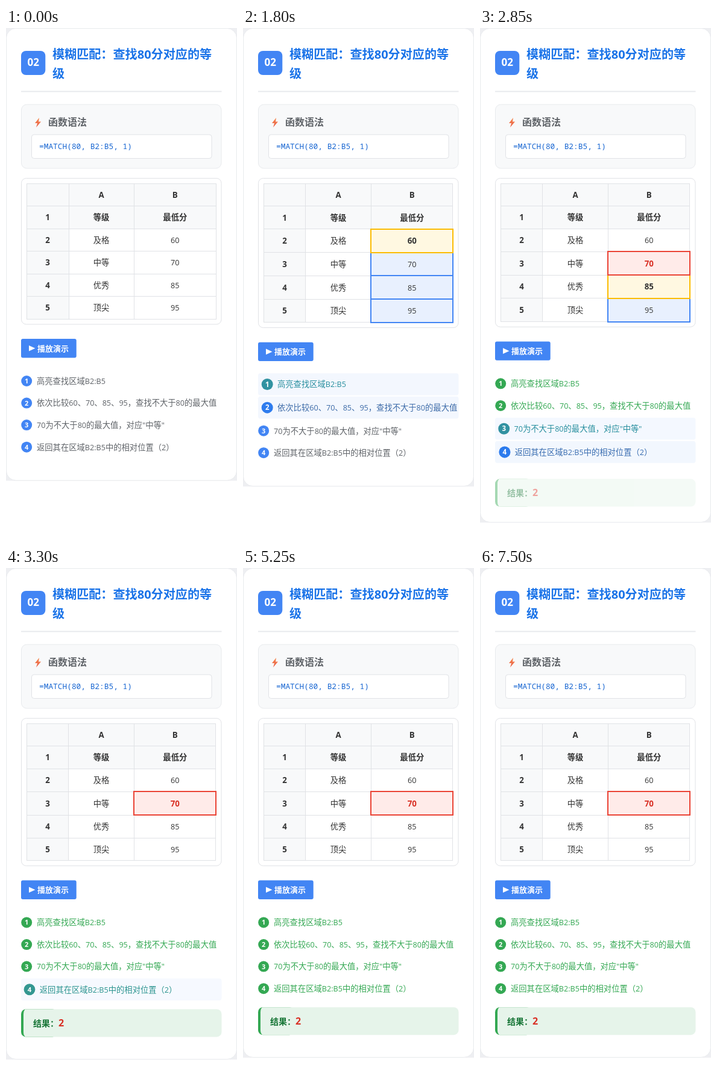
Write an HTML page that moves like this. It is 383 by 850 pixels and loops after 9750 ms.

```html
<!DOCTYPE html>
<html lang="zh-CN">
<head>
<meta charset="utf-8">
<title>MATCH</title>
<style>
  html, body { margin: 0; width: 100%; height: 100%; overflow: hidden; background: #fff; }
  svg { display: block; }
  text { font: 13.3px "Noto Sans CJK SC", "Noto Sans CJK", sans-serif; fill: #333; }
  .bold { font-weight: 700; }
  .mid { text-anchor: middle; }
  .latin { font-family: "Open Sans", "Noto Sans", sans-serif; font-size: .95em; }
  .bold .latin { font-size: 1em; }
  .code { font: 12.83px "Noto Sans Mono", "DejaVu Sans Mono", monospace; fill: #1967d2; white-space: pre; }
</style>
</head>
<body>
<svg id="stage" width="383" height="850" viewBox="0 0 383 850"></svg>
<script>
const LOOP = 9750;
const BLUE = '#1a73e8', SKY = '#4285f4', GREEN = '#34a853', GREY = '#5f6368';
const LINE = '#e0e2e6', PALE = '#f8f9fa';

// time, look of cells B2 to B5, active amount and done amount per item, result opacity
const STEPS = [
  [0,    '----', [0, 0, 0, 0],     [0, 0, 0, 0],    0],
  [1500, 'bbbb', [1, 0, 0, 0],     [0, 0, 0, 0],    0],
  [1800, 'ybbb', [.5, .5, 0, 0],   [.5, 0, 0, 0],   0],
  [1950, 'ybbb', [0, 1, 0, 0],     [1, 0, 0, 0],    0],
  [2250, '-ybb', [0, 1, 0, 0],     [1, 0, 0, 0],    0],
  [2550, '--yb', [0, 1, 0, 0],     [1, 0, 0, 0],    0],
  [2700, '-ryb', [0, 0, 1, 0],     [1, 1, 0, 0],    0],
  [2850, '-ryb', [0, 0, .46, .56], [1, 1, .5, 0],   .44],
  [3000, '-ryb', [0, 0, 0, 1],     [1, 1, 1, 0],    .88],
  [3150, '-ryb', [0, 0, 0, 1],     [1, 1, 1, 0],    1],
  [3300, '-r--', [0, 0, 0, .4],    [1, 1, 1, .6],   1],
  [3450, '-r--', [0, 0, 0, 0],     [1, 1, 1, 1],    1],
];

const CELL = {
  b: { edge: SKY, fill: '#e8f0fe', ink: '#333', cls: '' },
  y: { edge: '#fbbc04', fill: '#fff8e1', ink: '#333', cls: 'bold' },
  r: { edge: '#ea4335', fill: '#ffebe9', ink: '#d93025', cls: 'bold' },
};
const ROWS = [['', 'A', 'B'], ['1', '等级', '最低分'], ['2', '及格', '60'],
  ['3', '中等', '70'], ['4', '优秀', '85'], ['5', '顶尖', '95']];
const ITEMS = ['高亮查找区域B2:B5', '依次比较60、70、85、95，查找不大于80的最大值',
  '70为不大于80的最大值，对应"中等"', '返回其在区域B2:B5中的相对位置（2）'];

const mix = (a, b, k) => `color-mix(in srgb, ${b} ${k * 100}%, ${a})`;
const rect = (x, y, w, h, fill, r = 0, more = '') =>
  `<rect x="${x}" y="${y}" width="${w}" height="${h}" rx="${r}" fill="${fill}" ${more}/>`;
const outline = color => `stroke="${color}"`;
const line = (x1, y1, x2, y2) => `<path d="M${x1} ${y1}L${x2} ${y2}" stroke="${LINE}"/>`;
const text = (x, y, str, cls = '', style = '') =>
  `<text x="${x}" y="${y}" class="${cls}" style="${style}">` +
  str.replace(/[!-~]+/g, run => `<tspan class="latin">${run}</tspan>`) + '</text>';

function header() {
  const title = `font-size:20.1px;fill:${BLUE}`;
  return rect(25, 38, 40.3, 40, SKY, 8) +
    text(45.2, 63, '02', 'bold mid', 'font-size:17px;fill:#fff') +
    text(77, 50.6, '模糊匹配：查找80分对应的等', 'bold', title) +
    text(77, 82.6, '级', 'bold', title) +
    rect(25, 104.4, 332.5, 2, '#e8eaed') +
    rect(25.5, 127, 331.5, 106, PALE, 9, outline('#e8eaed')) +
    '<path d="M55 149 48 158H52L50 165 58 155.5H54Z" fill="url(#spark)"/>' +
    text(70, 162.4, '函数语法', 'bold', `font-size:16px;fill:${GREY}`) +
    rect(42.5, 177, 298.5, 39.5, '#fff', 4, outline(LINE)) +
    '<text x="55" y="201" class="code">=MATCH(80, B2:B5, 1)</text>';
}

// Every thick border line makes the rows on both sides a little taller.
function table(cells) {
  const lit = i => i >= 0 && i < 4 && cells[i] !== '-';
  const thick = k => lit(k - 2) || lit(k - 3) ? 0.62 : 0;
  const ys = [258.3];
  for (let k = 0; k < 6; k++) ys.push(ys[k] + 37.5 + thick(k) + thick(k + 1));
  const xs = /[byr]/.test(cells) ? [34.5, 103.5, 212.5, 347.5] : [34.5, 104.5, 212.5, 348.5];
  const crisp = ys.map(y => Math.floor(y) + 0.5);
  const bottom = ys[6] + 8.6;

  let out = rect(25.5, 249.5, 331.5, bottom - 249.5, '#fff', 8, outline(LINE)) +
    rect(xs[0], crisp[0], xs[3] - xs[0], crisp[2] - crisp[0], PALE) +
    rect(xs[0], crisp[0], xs[1] - xs[0], crisp[6] - crisp[0], PALE);
  crisp.forEach(y => out += line(xs[0] - .5, y, xs[3] + .5, y));
  xs.forEach(x => out += line(x, crisp[0], x, crisp[6]));

  // Upper cells own the shared border, so they go on last.
  for (let i = 3; i >= 0; i--) {
    if (!lit(i)) continue;
    const look = CELL[cells[i]], top = Math.round(ys[i + 2]);
    out += rect(212, top, 136, Math.round(ys[i + 3]) - top, look.fill, 0,
      outline(look.edge) + ' stroke-width="2"');
  }
  ROWS.forEach((row, r) => row.forEach((str, c) => {
    const look = c === 2 && CELL[cells[r - 2]];
    const cls = r < 2 || c === 0 ? 'bold' : look ? look.cls : '';
    out += text([69, 158, 280.3][c], (ys[r] + ys[r + 1]) / 2 + 4.8, str, cls + ' mid',
      look ? `fill:${look.ink}` : '');
  }));
  return { out, bottom };
}

function button(y) {
  const mid = y + 15.7;
  return rect(25, y, 91.7, 31.3, SKY, 3) +
    `<path d="M38 ${mid - 4.8}L48.5 ${mid}L38 ${mid + 4.8}Z" fill="#fff"/>` +
    text(52, mid + 4.9, '播放演示', 'bold', 'font-size:13px;fill:#fff');
}

function list(y, active, done) {
  let out = '';
  ITEMS.forEach((str, i) => {
    const a = active[i], d = done[i], bold = a > 0.75;
    const wrap = bold && i === 1;
    const height = 36.55 + (wrap ? 21 : 0);
    if (i) y += 4 * Math.max(a, active[i - 1]);
    const mid = y + 18.3, x = 34.2 + 12 * a;
    const ink = mix(d ? BLUE : mix(GREY, BLUE, a), GREEN, d);
    const dot = mix(mix(SKY, BLUE, a), GREEN, d);
    const lines = wrap ? [str.slice(0, -2), str.slice(-2)] : [str];
    if (a) out += rect(25, y, 332.5, height, '#e8f0fe', 4, `opacity="${a}"`);
    out += `<circle cx="${x}" cy="${mid}" r="${9 + a}" style="fill:${dot}"/>` +
      text(x, mid + 4, String(i + 1), 'bold mid', `font-size:${11 + a}px;fill:#fff`);
    lines.forEach((part, n) =>
      out += text(51 + 12 * a, mid + 4.9 + 20.9 * n, part, bold ? 'bold' : '', `fill:${ink}`));
    y += height;
  });
  return { out, bottom: y + 4 * active[3] };
}

function result(y, opacity) {
  const shift = 20 * (1 - opacity);
  return `<g opacity="${opacity}" transform="translate(25 ${y + shift})">` +
    rect(0, 0, 60, 46, GREEN, 8) +
    '<path d="M8 0H324.5a8 8 0 0 1 8 8V38a8 8 0 0 1-8 8H8a4 8 0 0 1-4-8V8a4 8 0 0 1 4-8Z" fill="#e6f4ea"/>' +
    text(20, 28.4, '结果：', 'bold', 'font-size:14px;fill:#137333') +
    text(62, 28.8, '2', 'bold', 'font-size:16px;fill:#d93025') + '</g>';
}

function scene([, cells, active, done, opacity]) {
  const grid = table(cells);
  const steps = list(grid.bottom + 75.8, active, done);
  const bottom = steps.bottom + (opacity ? 12.8 + 46 : 0) + 37.7;
  return '<defs><linearGradient id="spark" x2="0" y2="1"><stop stop-color="#f6874c"/>' +
    '<stop offset="1" stop-color="#e8604c"/></linearGradient></defs>' +
    rect(0, 0, 383, bottom, '#eeeff2') +
    rect(.5, .5, 382, bottom - 1, '#fff', 16, outline('#e8eaed')) +
    header() + grid.out + button(grid.bottom + 24.2) + steps.out +
    (opacity ? result(steps.bottom + 12.8, opacity) : '');
}

const stage = document.getElementById('stage');
const start = performance.now();
let shown;
function frame() {
  const t = (performance.now() - start) % LOOP;
  const step = STEPS.findLast(s => s[0] <= t);
  if (step !== shown) stage.innerHTML = scene(shown = step);
  requestAnimationFrame(frame);
}
frame();
</script>
</body>
</html>
```
